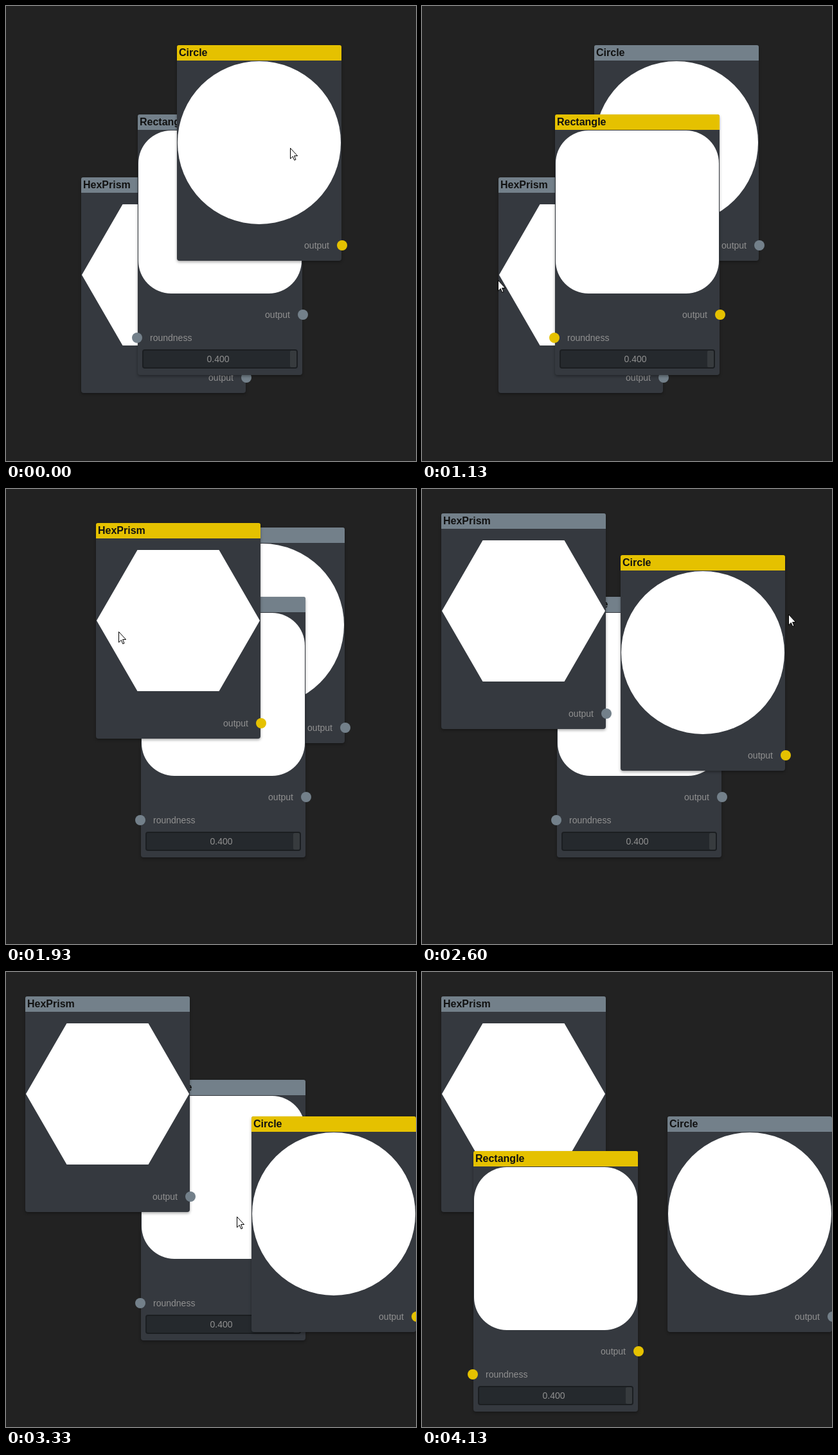
Recreate the animation shown at these times as an HTML page with a canvas. Size 638 by 709 pixels, loop 4.67 s.

```html
<!DOCTYPE html>
<html lang="en">
<head>
<meta charset="utf-8">
<title>Node editor</title>
<style>
  html, body { margin: 0; width: 638px; height: 709px; overflow: hidden; background: #222; }
  canvas { display: block; }
</style>
</head>
<body>
<canvas width="638" height="709"></canvas>
<script>
const ctx = document.querySelector('canvas').getContext('2d');
const LOOP = 4670, TICK = 200 / 3;
const YELLOW = '#e5c100', GREY = '#73808a', BODY = '#35393f', LABEL = '#909090';
const FONT = '"Liberation Sans", Arial, sans-serif';

// A path is a few [tick, x, y] points; grab is where the pointer holds the node.
const hex = {
  title: 'HexPrism', height: 336, grab: [55, 169],
  path: [[20, 117, 267], [24, 79, 124], [26, 85, 21], [28, 165, 23], [29, 135, 54], [32, 25, 39]],
  shape() {
    for (let i = 0; i < 6; i++) {
      const a = i * Math.PI / 3;
      ctx.lineTo(128 + 127 * Math.cos(a), 152 + 127 * Math.sin(a));
    }
  }
};
const rect = {
  title: 'Rectangle', height: 406, grab: [151, 211], slider: true,
  path: [[50, 205, 169], [57, 75, 280]],
  shape() { ctx.roundRect(1, 25, 254, 254, 51); }
};
const circle = {
  title: 'Circle', height: 336, grab: [232, 63],
  path: [[36, 266, 61], [39, 304, 104], [40, 360, 164], [43, 377, 226]],
  shape() { ctx.arc(128, 152, 127, 0, 7); }
};

const drags = [hex, circle, rect];
const picks = [[8, rect], ...drags.map(node => [node.path[0][0], node])];
const pan = [[16, 0, 0], [17, 2, 0], [18, 5, -1]];
const wander = [[0, 442, 221], [3, 345, 150], [8, 221, 309], [13, 96, 425], [17, 118, 427]];
const exit = [61, 10, 680];

// Smooth curve through the points, at rest at both ends.
function glide(points, tick) {
  const last = points.length - 1;
  if (tick <= points[0][0]) return points[0].slice(1);
  if (tick >= points[last][0]) return points[last].slice(1);
  const i = points.findIndex(point => point[0] >= tick) - 1;
  const a = points[i], b = points[i + 1];
  const span = b[0] - a[0], p = (tick - a[0]) / span;
  const slope = (j, axis) => j === 0 || j === last ? 0 :
    (points[j + 1][axis] - points[j - 1][axis]) / (points[j + 1][0] - points[j - 1][0]);
  return [1, 2].map(axis =>
    a[axis] + (b[axis] - a[axis]) * p * p * (3 - 2 * p) +
    span * p * (1 - p) * (slope(i, axis) * (1 - p) - slope(i + 1, axis) * p));
}

const add = (a, b) => [a[0] + b[0], a[1] + b[1]];
const place = (node, tick) => add(glide(node.path, tick), glide(pan, tick));
// The dragged node trails the pointer by half a tick.
const hold = (node, tick) => add(place(node, tick + 0.5), node.grab);

function cursorAt(tick) {
  if (tick <= wander.at(-1)[0]) return glide(wander, tick);
  const next = drags.find(node => tick <= node.path.at(-1)[0]);
  const prev = drags.findLast(node => tick > node.path.at(-1)[0]);
  const start = next && next.path[0][0];
  if (next && tick >= start) return hold(next, tick);
  const end = prev && prev.path.at(-1)[0];
  return glide([
    prev ? [end, ...hold(prev, end)] : wander.at(-1),
    next ? [start, ...hold(next, start)] : exit
  ], tick);
}

function box(x, y, w, h, r, color) {
  ctx.fillStyle = color;
  ctx.beginPath();
  ctx.roundRect(x, y, w, h, r);
  ctx.fill();
}

function port(x, y, color) {
  ctx.fillStyle = color;
  ctx.beginPath();
  ctx.arc(x, y, 8, 0, 7);
  ctx.fill();
}

function text(str, x, y, align = 'left', color = LABEL, font = '14px ') {
  ctx.font = font + FONT;
  ctx.textAlign = align;
  ctx.fillStyle = color;
  ctx.fillText(str, x, y);
}

function drawNode(node, tick, accent) {
  ctx.save();
  ctx.translate(...place(node, tick).map(Math.round));
  ctx.shadowColor = 'rgba(0,0,0,.35)';
  ctx.shadowBlur = 4;
  ctx.shadowOffsetY = 2;
  box(0, 0, 256, node.height, 4, BODY);
  ctx.shadowColor = 'transparent';
  box(0, 0, 256, 24, [3, 3, 0, 0], accent);
  text(node.title, 3, 17, 'left', '#111', 'bold 16px ');
  ctx.fillStyle = '#fff';
  ctx.beginPath();
  node.shape();
  ctx.fill();
  text('output', 237, 317, 'right');
  port(257, 312, accent);
  if (node.slider) {
    port(-1, 348, accent);
    text('roundness', 19, 353);
    box(7, 366, 242, 30, 4, '#1b1e21');
    box(9, 368, 238, 26, 2, '#25292d');
    box(237, 368, 10, 26, 2, '#373b3e');
    text('0.400', 125, 386, 'center');
  }
  ctx.restore();
}

function drawCursor(x, y) {
  ctx.save();
  ctx.translate(x, y);
  ctx.strokeStyle = '#000';
  ctx.fillStyle = '#fff';
  const arrow = new Path2D('M.5 .5V17L4.3 13.4L6.8 19.3L9 18.3L6.6 12.5H11.6Z');
  ctx.fill(arrow);
  ctx.stroke(arrow);
  ctx.restore();
}

function draw(now) {
  const tick = Math.floor(now % LOOP / TICK + 0.06);
  let order = [hex, rect, circle];
  for (const [start, node] of picks) {
    if (tick > start) order = [...order.filter(other => other !== node), node];
  }
  ctx.fillStyle = '#222';
  ctx.fillRect(0, 0, 638, 709);
  order.forEach((node, i) => drawNode(node, tick, i === 2 ? YELLOW : GREY));
  if (tick <= exit[0]) drawCursor(...cursorAt(tick).map(Math.round));
}

const begin = performance.now();
function loop() {
  draw(performance.now() - begin);
  requestAnimationFrame(loop);
}
loop();
</script>
</body>
</html>
```
